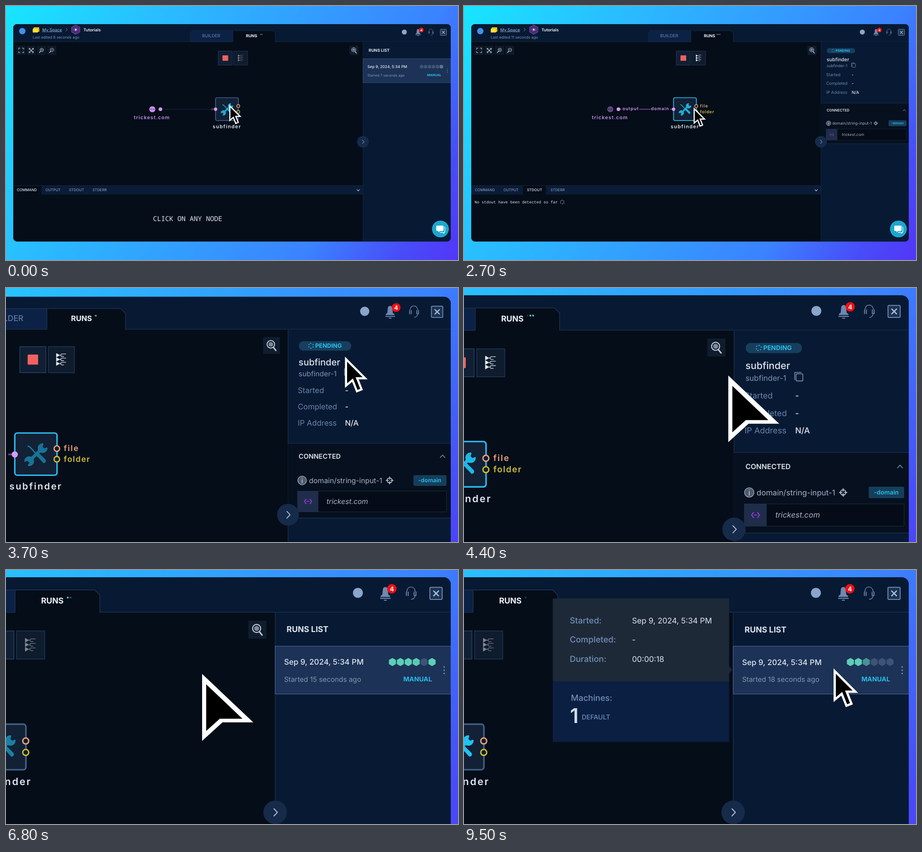
Animation, 998 px wide and 561 px high, one loop 9600 ms. Source, as an HTML page:

```html
<!DOCTYPE html>
<html lang="en">
<head>
<meta charset="utf-8">
<title>Workflow run</title>
<style>
html, body { margin: 0; width: 100%; height: 100%; overflow: hidden; background: #2fa8ff; }
svg { display: block; width: 998px; height: 561px; font-family: Inter, sans-serif; text-rendering: geometricPrecision; }
.mono { font-family: "Noto Sans Mono", monospace; }
.log { font-family: "Liberation Mono", monospace; }
.ln { fill: none; stroke-linecap: round; stroke-linejoin: round; }
</style>
</head>
<body>
<svg viewBox="0 0 998 561" xmlns="http://www.w3.org/2000/svg">
  <defs>
    <linearGradient id="bg" gradientUnits="userSpaceOnUse" x1="0" y1="0" x2="998" y2="561">
      <stop offset="0" stop-color="#17e6ff"/><stop offset=".25" stop-color="#29bfff"/>
      <stop offset=".74" stop-color="#3b82ff"/><stop offset=".9" stop-color="#484cf8"/>
      <stop offset="1" stop-color="#5236f8"/>
    </linearGradient>
    <clipPath id="frame"><rect x="16" y="40.200" width="966" height="480" rx="8"/></clipPath>
  </defs>
  <rect width="998" height="561" fill="url(#bg)"/>
  <g id="win">
    <g id="app" clip-path="url(#frame)"></g>
    <g id="cursor">
      <path id="arrow" d="M2.500 6V69L18 56L28.500 82.500L39.500 78L29 51.500H48Z" fill="#000" stroke="#fff" stroke-width="5"/>
      <g id="head">
        <path d="M0 0L113 107H45L0 148Z" fill="#fff"/>
        <path d="M9 23L89 99H39L9 126Z" fill="#000"/>
      </g>
    </g>
  </g>
</svg>
<script>
const $ = id => document.getElementById(id);
const LOOP = 9600, SELECT = 700, DESELECT = 6000, POPUP = 8900;

// Markup helpers
const text = (x, y, size, fill, str, extra = '') =>
  `<text x="${x}" y="${y}" font-size="${size}" fill="${fill}" ${extra}>${str}</text>`;
const rect = (x, y, w, h, fill, extra = '') =>
  `<rect x="${x}" y="${y}" width="${w}" height="${h}" fill="${fill}" ${extra}/>`;
const dot = (x, y, r, fill, extra = '') =>
  `<circle cx="${x}" cy="${y}" r="${r}" fill="${fill}" ${extra}/>`;
const line = (d, color, w = 1, extra = '') =>
  `<path class="ln" d="${d}" stroke="${color}" stroke-width="${w}" ${extra}/>`;
const group = (id, body) => `<g id="${id}">${body}</g>`;
const hex = (x, y, r, fill, extra = '') => {
  const pts = [0, 1, 2, 3, 4, 5].map(i => {
    const a = (i + .5) * Math.PI / 3;
    return (x + r * Math.cos(a)).toFixed(2) + ',' + (y + r * Math.sin(a)).toFixed(2);
  });
  return `<polygon points="${pts.join(' ')}" fill="${fill}" ${extra}/>`;
};
const bold = 'font-weight="700"', semi = 'font-weight="600"', med = 'font-weight="500"';
const spaced = n => `font-weight="600" letter-spacing="${n}"`;
const border = (c, w = 1) => `stroke="${c}" stroke-width="${w}"`;

const NAVY = '#081a33', DARK = '#050d18', EDGE = '#1b304f', MUTED = '#7d95b8',
  PALE = '#dfe7f2', CYAN = '#27bdec', PINK = '#d79bf8', ICON = '#c3cede', STEEL = '#7089b0';

const header = () =>
  rect(16, 40, 966, 39, NAVY) + line('M16 78.900H982', EDGE, .7) +
  dot(36, 55.5, 7, '#3f92ea') +
  '<path d="M62 47H73L74 56L70 58H59V51Z" fill="#e3c416"/><path d="M59 51H70V58.500H59Z" fill="#ffe23a"/>' +
  text(80, 55.5, 9.15, '#86a9d6', 'My Space', med + ' text-decoration="underline"') +
  line('M132.500 49L135.500 52.200L132.500 55.400', MUTED) +
  hex(154, 52.2, 10.5, '#4a2c74', border('#7d52b4')) +
  line('M149 52.200Q154 46 159 52.200Q154 58 149 52.200', '#8e5fc4') + dot(154, 52.2, 2, '#e9d6ff') +
  text(171, 55.5, 9.1, '#f0f4fa', 'Tutorials', semi) +
  text(59, 72, 8.24, MUTED, '', 'id="edited"') +
  `<path d="M407.500 79V59L412 54.300H501V79Z" fill="#0b2145" ${border(EDGE, .8)}/>` +
  `<path d="M501 80V54.300H589L594.600 60V80Z" fill="${DARK}"/>` +
  line('M501 79V54.300H589L594.600 60V79', EDGE, .8) +
  text(433, 69.3, 9.5, '#627ba2', 'BUILDER', med) +
  text(529.7, 69.3, 8.9, '#eef3fa', 'RUNS', bold) +
  [0, 1, 2].map(i => dot(559.2 + i * 3, 62.7, 1.05, '#4fc4c6', `id="dot${i}"`)).join('') +
  dot(879.5, 57.5, 5.5, '#89a5c9') +
  `<path d="M904.500 62V60.800L906.500 59.500L907 54Q907.300 51 909.800 51Q912.300 51 912.500 54L913 59.500L915 60.800V62Z" fill="${STEEL}"/>` +
  line('M904.500 63.600H915.200', STEEL, 1.1) + line('M908.600 65.600H911', STEEL) +
  dot(917, 53, 5.2, '#f50d14') + text(917, 55.7, 7, '#fff', '4', bold + ' text-anchor="middle"') +
  line('M933.500 56Q934 51 938 51Q942 51 942.800 56M942.800 60Q942 64.500 938.500 64.700', '#667fa4', .8) +
  line('M933 56.500V60.500M935 56.500V60.500M941.600 56.500V60.500M943.600 56.500V60.500', '#667fa4', 1.1) +
  rect(959, 51.4, 13.5, 13.4, '#1b3253', 'rx="1" ' + border(STEEL)) +
  line('M963.200 55.500L968.400 60.700M968.400 55.500L963.200 60.700', '#a5bad6', 1.4);

const lens = (x, sign) => dot(x + .5, 97, 3.7, 'none', border(ICON)) + line(`M${x - 2.2} 100L${x - 5} 103`, ICON, 1.4) +
  line(`M${x - 1} 97h3` + (sign ? `M${x + .5} 95.500v3` : ''), ICON, .9);

const tools = () =>
  [33, 55.5, 78.5, 101].map(x => rect(x - 10, 88, 20, 20, '#0e1a2a')).join('') +
  line('M28 95.500V93H31M36 93H39V95.500M39 100.500V103H36M31 103H28V100.500', ICON, 1.1) +
  line('M51.500 94L60 102.500M60 94L51.500 102.500', ICON, 1.1) +
  line('M51 96V93.500H53.500M58 93.500H60.500V96M60.500 100.500V103H58M53.500 103H51V100.500', ICON) +
  lens(78.5, true) + lens(101, false) +
  rect(758.5, 88.2, 20, 20, '#0f1d2f') + dot(767.7, 96.8, 4.5, 'none', border(ICON, 1.1)) +
  dot(767.7, 96.8, 2.8, '#7d8a9c') + line('M770.800 100.500L773.700 104.200', ICON, 1.5) +
  rect(468.7, 99.6, 31, 31, '#101f34', border('#223b5c')) +
  rect(478, 109, 12.5, 12, '#f0625f', 'rx="1"') +
  rect(502.7, 99.6, 31, 31, '#0f1c2e', border('#1b314e')) +
  group('list', [109.8, 114.8, 119.8].map(y =>
    `<path d="M512 ${y - 2.6}L516.500 ${y}L512 ${y + 2.6}Z" fill="#e6edf5"/>` +
    line(`M515 ${y}H517L518.500 ${y - 1.5}H523.500M517 ${y}L518.500 ${y + 1.5}H521`, '#d5dfea', .7)).join(''));

const graph = () =>
  group('idleEdge', line('M345 228H457', '#1d2a3d', 1) + '<path d="M454 225L459 228L454 231Z" fill="#3a4a63"/>') +
  group('liveEdge', line('M345 228H462', '#693d8b', 2.2) +
    rect(348, 222, 39, 11, DARK) + rect(412, 222, 43, 11, DARK) +
    text(350, 230.3, 9.5, PINK, 'output', spaced(1)) + text(413, 230.3, 9.5, PINK, 'domain', spaced(1))) +
  group('source', dot(323, 228, 6.6, '#cf94f4') +
    line('M321 225.800L319 228L321 230.200M325 225.800L327 228L325 230.200M321.500 228H324.500', '#4b2867', .9)) +
  dot(341, 228, 4, PINK) +
  text(282.3, 250, 11, '#c98cf0', 'trickest.com', spaced(1.1)) +
  rect(462.7, 202.5, 50.3, 50.3, '#122135', 'id="box" rx="3" stroke-width="1.700"') +
  group('icon', line('M478.500 218L481 219.500L487 226', '#1fc3f3', 1.6) +
    '<path d="M488 229L491 226L499.500 234.500Q500.500 238 497 238.500Z" fill="#1fc3f3"/>' +
    line('M492.500 223.500L482.500 233.500', '#1fc3f3', 3.8) +
    line('M496 215.500A5 5 0 1 0 500.800 220.500L497.500 221.800L495 219Z', '#1fc3f3', 1.6, 'style="fill:#1fc3f3"') +
    line('M479 241A5 5 0 1 0 474.800 236L478 234.700L481 238Z', '#1fc3f3', 1.6, 'style="fill:#1fc3f3"')) +
  dot(462.7, 228, 3.7, PINK) +
  dot(512.8, 221.1, 3.3, '#111d2c', border('#e9a27a', 1.5)) +
  dot(512.8, 233.7, 3.3, '#111d2c', border('#cdbd35', 1.5)) +
  group('ports', text(521, 224.2, 9.5, '#e9a27a', 'file', spaced(1)) + text(521, 236.7, 9.5, '#cdbd35', 'folder', spaced(.8))) +
  text(456.3, 269.8, 11, PALE, 'subfinder', spaced(1.3));

const tab = (x, w, tx, str, id) => rect(x, 397, w, 20, DARK, `id="bg${id}"`) + text(tx, 409.3, 8, MUTED, str, `id="${id}" ` + med);

const drawer = () =>
  rect(16, 396.5, 772, 20, '#0a1c37') + line('M16 396.500H788', EDGE, .6) +
  tab(16, 62, 24, 'COMMAND', 'cmd') + text(87, 409.3, 8, MUTED, 'OUTPUT', med) +
  tab(130, 51, 139, 'STDOUT', 'out') + text(191, 409.3, 8, MUTED, 'STDERR', med) +
  line('M774.800 405.500L777.600 408.500L780.400 405.500', '#a6b8d2', 1.2) +
  group('hint', text(324.5, 474.5, 15, PALE, 'CLICK ON ANY NODE', 'class="mono"')) +
  group('log', text(23.3, 436, 8.76, PALE, 'No stdout have been detected so far', 'class="log"') +
    dot(217, 433, 4, 'none', border(ICON, 1.2) + ' id="spinA" stroke-dasharray="2 2.190"'));

const runs = () =>
  text(800.8, 101, 8.9, PALE, 'RUNS LIST', bold) +
  rect(788.2, 116.4, 194, 52.8, '#1c3256', border('#4c6894', .6)) +
  text(798, 137, 8.5, PALE, 'Sep 9, 2024, 5:34 PM', med) +
  text(798, 155.7, 7.7, '#8397b5', '', 'id="ago"') +
  text(929.7, 155.1, 7.1, CYAN, 'MANUAL', bold) +
  [0, 1, 2, 3, 4, 5].map(i => hex(917.6 + i * 8.75, 133.9, 4.5, '#3c587c', `id="hex${i}"`)).join('') +
  [139.3, 142.9, 146.5].map(y => dot(974.7, y, .8, '#7f97bc')).join('');

const details = () =>
  rect(801, 93.1, 62.5, 11.2, '#173f5d', 'rx="5.600"') +
  dot(815.5, 98.6, 2.9, 'none', border(CYAN, .9) + ' id="spinB" stroke-dasharray="1.400 1.640"') +
  text(820.5, 101, 7, CYAN, 'PENDING', bold) +
  text(800.8, 122, 10.8, PALE, 'subfinder', med) + text(800.8, 135, 8.5, MUTED, 'subfinder-1') +
  rect(857, 127.3, 7.5, 8, 'none', 'rx="1" ' + border(MUTED, .8)) + line('M855.500 133.800V125.800H862.500', MUTED, .8) +
  ['Started', 'Completed', 'IP Address'].map((s, i) =>
    text(799.8, 154.7 + i * 19.4, 9.1, '#6984ad', s) +
    text(856, 154.7 + i * 19.4, 9, PALE, i < 2 ? '-' : 'N/A', med)).join('') +
  rect(788, 214.6, 194, 89, '#06101e') + line('M788 214.700H982M788 303.900H982', EDGE, .7) +
  text(800.8, 233.3, 7.9, PALE, 'CONNECTED', semi) + line('M969.500 231.700L972.300 228.700L975 231.700', '#5f7597', 1.1) +
  dot(805, 259, 5.2, '#4d5a6c', border('#8d9bb0', .8)) + line('M805 258V262M805 256V256.100', '#bac5d4', .9) +
  text(813.2, 262, 8.55, '#a7b4c8', 'domain/string-input-1') +
  dot(909.2, 259, 3, 'none', border(ICON, .9)) + line('M909.200 254.700V257.700M909.200 260.300V263.300M904.900 259H907.900M910.500 259H913.500', ICON, .9) +
  rect(937.5, 252.6, 39.4, 12.8, '#163e5a', 'rx="1.500"') + text(943.3, 261.4, 6.8, CYAN, '-domain', semi) +
  rect(799.5, 271.7, 177.4, 24.8, '#050c17', border('#1a2a43', .6)) + rect(799.5, 271.7, 24.8, 24.8, '#1f2d4b') +
  line('M810 281.500Q808.500 281.500 808.700 283L807.500 284L808.700 285Q808.500 286.700 810 286.700M814 281.500Q815.500 281.500 815.300 283L816.500 284L815.300 285Q815.500 286.700 814 286.700M810.700 284H813.300', '#a33be0', .9) +
  text(834, 287, 8.5, '#a7b4c8', 'trickest.com', 'font-style="italic"');

const popup = () =>
  '<path d="M783 137.500L787 142.500L783 147.500Z" fill="#1e2937"/>' +
  rect(589, 63.7, 194.7, 92, '#1e2937') + rect(589, 155.2, 194.7, 67, '#0b1f42') +
  ['Started:', 'Completed:', 'Duration:'].map((s, i) => text(607.7, 91.1 + i * 21.2, 9.25, '#718fb9', s, med)).join('') +
  text(676.5, 91.1, 8.6, PALE, 'Sep 9, 2024, 5:34 PM') + text(676.5, 112.3, 8.6, PALE, '-') +
  text(676.5, 133.5, 8.6, PALE, '', 'id="clock"') +
  text(609, 176.6, 9.25, '#718fb9', 'Machines:', med) +
  text(608, 201, 22.5, '#cfdbea', '1', semi) + text(621, 197, 7.2, '#718fb9', 'DEFAULT', med);

$('app').innerHTML =
  rect(16, 40, 966, 481, DARK) + header() + tools() + graph() + drawer() +
  rect(788.2, 79.2, 194, 441, NAVY) + line('M788.200 79V520', EDGE, .7) +
  group('runs', runs()) + group('details', details()) +
  dot(788.1, 299.9, 13, '#162a4a') + line('M786.800 295.900L790.600 299.900L786.800 303.900', '#b1c2da', 1) +
  dot(959.2, 492.5, 18.6, '#1ca7cf') +
  '<path d="M952 485H964Q966 485 966 487V495Q966 497 964 497H958L955 500V497H952Q950 497 950 495V487Q950 485 952 485Z" fill="#fff"/>' +
  line('M967.500 488Q969 488.500 969 490V498Q969 500 967 500V502L964 500H959', '#fff', 1.3) +
  group('popup', popup());

// Motion
const clamp = v => Math.min(1, Math.max(0, v));
const smooth = v => v * v * (3 - 2 * v);
const mod = (v, n) => ((v % n) + n) % n;
const show = (id, on) => $(id).setAttribute('opacity', +on);
const spring = (t, start, rate) => {
  const q = Math.max(0, t - start) / 1000 * rate;
  return 1 - (1 + q) * Math.exp(-q);
};
const zoomAt = k => `matrix(${k} 0 0 ${k} ${982 * (1 - k)} ${64.5 * (1 - k)})`;
// Fills from the left, then empties from the left
const sweep = (p, at, half) => clamp(p - at) * (1 - clamp(p - half - at));

// time, x, y in window space
const PATH = [[0, 493, 218], [1700, 493, 218], [2600, 507, 224], [2700, 507, 224], [3600, 856, 111.5],
  [3950, 856, 111.5], [4850, 707.5, 147], [8150, 707.5, 147], [8950, 899, 140.9], [LOOP, 899, 140.9]];

function cursorAt(t) {
  const i = PATH.findIndex((k, n) => n && t <= k[0]);
  const [t0, x0, y0] = PATH[i - 1], [t1, x1, y1] = PATH[i];
  const k = smooth((t - t0) / (t1 - t0));
  return [x0 + (x1 - x0) * k, y0 + (y1 - y0) * k];
}

const HEX_ORDER = [0, 1, 2, 3, 4, 2.8];

function draw(t) {
  const s = t / 1000, selected = t >= SELECT && t < DESELECT;
  const zoom = spring(t, 2960, 4.6);
  $('win').setAttribute('transform', zoomAt(1 + zoom));
  $('bg').setAttribute('gradientTransform', zoomAt(1 + zoom * .45));

  const [x, y] = cursorAt(t), onCanvas = t > 3950 && x < 788;
  $('cursor').setAttribute('transform', `translate(${x} ${y}) scale(.5)`);
  show('arrow', !onCanvas);
  show('head', onCanvas);

  for (const id of ['liveEdge', 'ports', 'details', 'log', 'bgout']) show(id, selected);
  for (const id of ['idleEdge', 'runs', 'hint', 'bgcmd']) show(id, !selected);
  $('cmd').setAttribute('fill', selected ? MUTED : PALE);
  $('out').setAttribute('fill', selected ? PALE : MUTED);
  $('box').setAttribute('stroke', selected ? '#2bbcf0' : '#426088');
  show('list', selected ? 1 : .5);
  show('source', selected ? .45 : 1);
  show('icon', .75 + .25 * Math.cos((s - 7.85) / 1.63 * 2 * Math.PI));

  const passed = Math.floor(7.7 + 1.09 * s);
  $('ago').textContent = `Started ${passed} seconds ago`;
  $('edited').textContent = `Last edited ${Math.floor(8.2 + 1.09 * s)} seconds ago`;
  $('clock').textContent = '00:00:' + String(passed).padStart(2, '0');
  show('popup', clamp((t - POPUP) / 200));

  $('spinA').setAttribute('transform', `rotate(${s * 360} 217 433)`);
  $('spinB').setAttribute('transform', `rotate(${s * 360} 815.5 98.6)`);

  const dots = mod(1.4 + 4.02 * (s - 6.8), 6);
  for (let i = 0; i < 3; i++) show('dot' + i, sweep(dots, i, 3));

  const fill = mod(3.95 + 3.9 * (s - 6.8), 12);
  HEX_ORDER.forEach((at, i) => {
    const k = t < SELECT ? 0 : sweep(fill, at, 6);
    const mix = (a, b) => Math.round(a + (b - a) * k);
    const base = t < SELECT && i === 5 ? [96, 117, 147] : [60, 84, 118];
    $('hex' + i).setAttribute('fill', `rgb(${mix(base[0], 92)},${mix(base[1], 206)},${mix(base[2], 184)})`);
  });
}

let start;
function tick(now) {
  start ??= now;
  draw(Math.floor((now - start) % LOOP / 100) * 100);
  requestAnimationFrame(tick);
}
draw(0);
requestAnimationFrame(tick);
</script>
</body>
</html>
```
